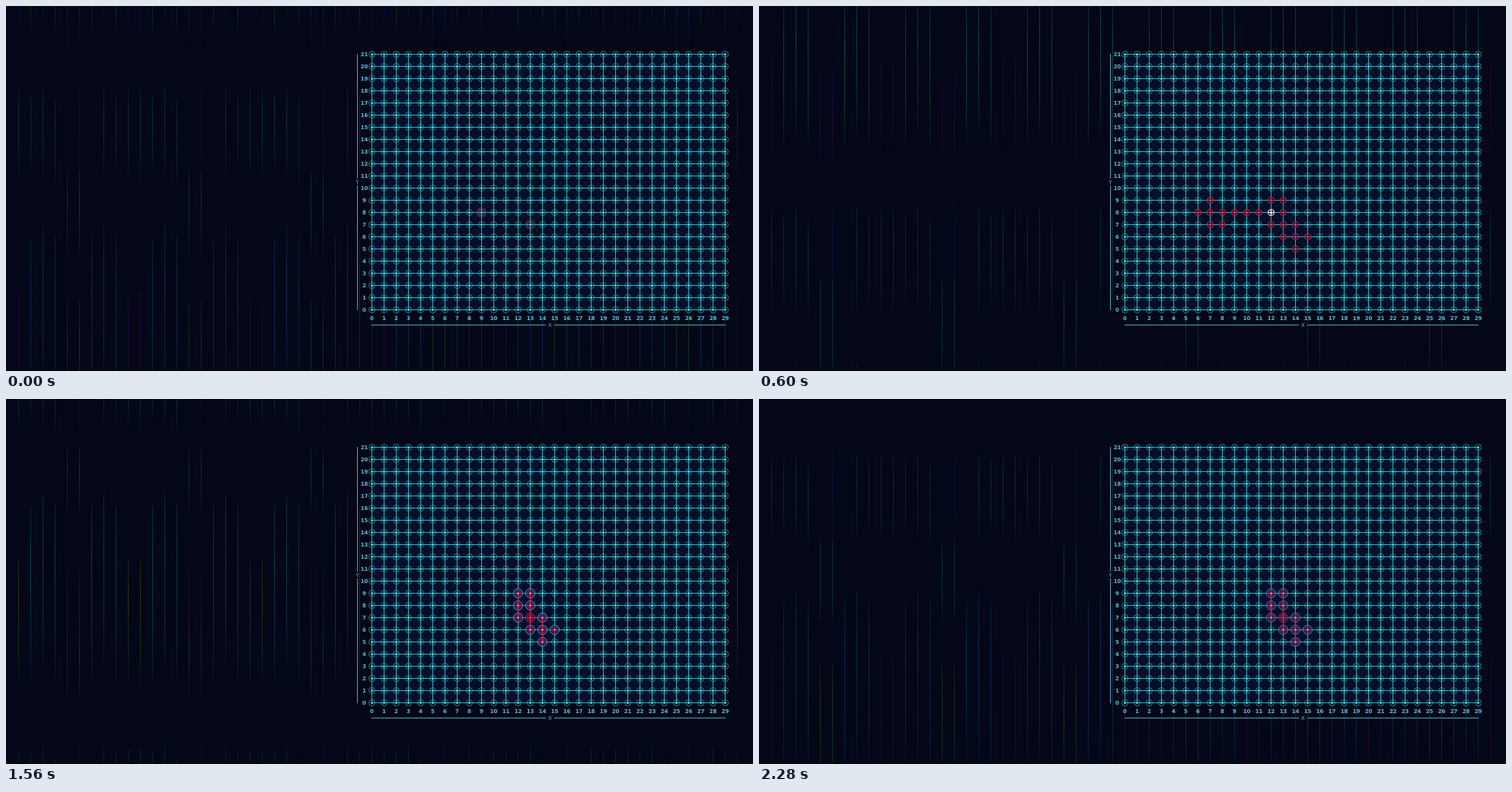
Animation of 981 by 480 pixels, one loop 2.4 s. Source, as an HTML page with a canvas:

```html
<!DOCTYPE html>
<html>
<head>
<meta charset="utf-8">
<style>
html, body { margin: 0; width: 100%; height: 100%; overflow: hidden; background: #030717; }
canvas { display: block; }
</style>
</head>
<body>
<canvas id="stage" width="981" height="480"></canvas>
<script>
const ctx = document.getElementById('stage').getContext('2d');
const LOOP = 2400, STEP = 120, TRAVEL = 520;
const COLS = 30, ROWS = 22, CELL = 16;
const gx = i => 480.5 + CELL * i;
const gy = j => 399.5 - CELL * j;

// Rain progress is uneven in time: [ms, distance]
const PACE = [[0, 0], [360, 95], [600, 158], [960, 235], [1560, 350], [2040, 435], [2280, 485], [2400, 520]];
// Per lane: top and bottom of the leading streak and of the weaker one behind it
const LEAD = [[32, 130], [-38, 125], [-55, 105], [-40, 122], [45, 145]];
const TRAIL = [[-60, 36], [-55, 25], [-63, 35], [-48, 45], [-68, 40]];

const LEFT = [[6, 8], [7, 9], [7, 8], [7, 7], [8, 8], [8, 7], [9, 8], [10, 8], [11, 8]];
const RIGHT = [[12, 9], [12, 8], [12, 7], [13, 9], [13, 8], [13, 7], [13, 6], [14, 7], [14, 6], [14, 5], [15, 6]];
const ALL = [...LEFT, ...RIGHT];
const SEEDS = [[9, 8], [13, 7]];
const isSeed = ([x, y]) => SEEDS.some(s => s[0] === x && s[1] === y);
const spread = ([x, y]) => Math.min(...SEEDS.map(s => Math.abs(s[0] - x) + Math.abs(s[1] - y)));

function progress(t) {
  const n = PACE.findIndex(p => p[0] > t);
  const [t0, p0] = PACE[n - 1], [t1, p1] = PACE[n];
  return p0 + (p1 - p0) * (t - t0) / (t1 - t0);
}

function line(x0, y0, x1, y1, color, width = 1) {
  ctx.strokeStyle = color;
  ctx.lineWidth = width;
  ctx.beginPath();
  ctx.moveTo(x0, y0);
  ctx.lineTo(x1, y1);
  ctx.stroke();
}

function ring([i, j], r, stroke, fill) {
  ctx.beginPath();
  ctx.arc(gx(i), gy(j), r, 0, 7);
  if (fill) {
    ctx.fillStyle = fill;
    ctx.fill();
  }
  if (stroke) {
    ctx.strokeStyle = stroke;
    ctx.lineWidth = 1;
    ctx.stroke();
  }
}

function streak(x, top, bottom, hue, hueEnd, alpha) {
  if (bottom <= 0 || top >= 480 || bottom <= top) return;
  const g = ctx.createLinearGradient(0, top, 0, bottom);
  const tone = (h, a) => `hsla(${h}, 85%, 45%, ${a * alpha})`;
  g.addColorStop(0, tone(hue, 0.6));
  g.addColorStop(0.3, tone(hue, 1));
  g.addColorStop(0.7, tone(hueEnd, 0.8));
  g.addColorStop(1, tone(hueEnd, 0.3));
  ctx.fillStyle = g;
  ctx.fillRect(x, top, 1, bottom - top);
}

function leadHue(lane, d) {
  if (lane === 0) return d < 300 ? 280 + 0.55 * d : 285;
  if (lane === 4) return 230 + 0.55 * d;
  return Math.min(205, 150 + 0.16 * Math.max(0, d));
}

function rain(t) {
  const p = progress(t);
  for (let k = 1; k <= 60; k++) {
    const m = k % 10, x = k * CELL;
    const lane = m < 2 ? 0 : m < 6 ? m - 1 : 10 - m;
    const tinted = lane % 4 === 0;
    for (const q of [p, p + TRAVEL]) {
      const d = q - 95, e = q - 350;
      const hue = leadHue(lane, d);
      const [a, b] = LEAD[lane], [c, f] = TRAIL[lane];
      const top = d < 0 ? a + d : a + 0.55 * d + 0.0006 * d * d;
      streak(x, top, b + 0.97 * d, hue, hue + (tinted ? 40 : 0), tinted ? 0.22 : 0.3);
      if (m !== 5 && m !== 7) {
        const h = lane === 4 ? 220 : 165;
        streak(x, c + e, f + 1.12 * e, h, h, 0.2);
      }
      if (lane === 4) streak(x, 65 + 0.9 * e, 150 + 1.05 * e, 170, 170, 0.22);
    }
  }
}

function grid() {
  ctx.fillStyle = '#020f29';
  ctx.fillRect(480, 63, 465, 337);
  for (let i = 0; i < COLS; i++) {
    for (let j = 0; j < ROWS; j++) ring([i, j], 4, '#1c9096');
  }
  for (let j = 0; j < ROWS; j++) line(480, gy(j), 945, gy(j), '#22b6c0');
  for (let i = 0; i < COLS; i++) line(gx(i), 63, gx(i), 400, '#22b6c0');
  for (let i = 0; i < COLS; i++) {
    for (let j = 0; j < ROWS; j++) ring([i, j], 1.5, null, '#5cd6e0');
  }
}

function axes() {
  const ink = '#4fa3c4';
  line(461.5, 63, 461.5, 227, ink);
  line(461.5, 236, 461.5, 400, ink);
  line(480, 419.5, 709, 419.5, ink);
  line(720, 419.5, 945, 419.5, ink);
  ctx.textAlign = 'center';
  ctx.textBaseline = 'alphabetic';
  ctx.fillStyle = '#5cbcda';
  ctx.font = 'bold 7px "DejaVu Sans", sans-serif';
  for (let i = 0; i < COLS; i++) ctx.fillText(i, gx(i), 413);
  for (let j = 0; j < ROWS; j++) ctx.fillText(j, 470.5, gy(j) + 2.5);
  ctx.font = '7px "DejaVu Sans", sans-serif';
  ctx.fillText('X', 714.5, 422);
  ctx.fillText('Y', 461.5, 234);
}

function links(cells, alpha) {
  for (const [x, y] of cells) {
    if (cells.some(c => c[0] === x && c[1] === y + 1)) {
      line(gx(x), gy(y), gx(x), gy(y + 1), `rgba(240, 20, 50, ${alpha})`, 1.5);
    }
  }
}

function search(t) {
  const reach = t / STEP * 1.4;
  const found = ALL.filter(c => spread(c) <= reach);
  if (t) links(found, 0.95);
  for (const c of found) {
    if (!isSeed(c)) {
      ring(c, 4, 'rgba(180, 50, 90, 0.5)');
      ring(c, 1.6, null, '#e07898');
    }
  }
  for (const c of SEEDS) {
    ring(c, 6, '#c81848');
    if (t) ring(c, 3.5, '#a83058');
  }
}

function marked() {
  for (const c of ALL) {
    const meet = c[0] === 12 && c[1] === 8;
    const [x, y] = [gx(c[0]), gy(c[1])];
    const color = meet ? '#fff' : '#c82048';
    ctx.fillStyle = '#020f29';
    ring(c, 4, color, '#020f29');
    line(x - 4, y, x + 4, y, color);
    line(x, y - 4, x, y + 4, color);
    ring(c, 1.5, null, meet ? '#fff' : '#e04068');
  }
}

function settled(t) {
  const fade = Math.max(0, 0.7 - (t - 720) / 480);
  for (const c of LEFT) ring(c, 6, `rgba(45, 90, 190, ${fade})`);
  const glow = 0.7 + 0.3 * Math.cos((t - 1500) / 960 * 2 * Math.PI);
  for (const c of RIGHT) {
    const seed = isSeed(c);
    ring(c, 6, seed ? '#d01848' : `rgba(80, 165, 240, ${glow})`, `rgba(60, 0, 60, ${0.6 * glow})`);
    ring(c, 3.5, `rgba(200, 20, 85, ${0.3 + 0.4 * glow})`);
  }
  links(RIGHT, 0.85);
  for (const c of RIGHT) ring(c, 1.6, null, isSeed(c) ? '#e82c58' : '#f070a0');
}

function draw(now) {
  const t = Math.floor(now % LOOP / STEP) * STEP;
  ctx.fillStyle = '#030717';
  ctx.fillRect(0, 0, 981, 480);
  rain(t);
  grid();
  axes();
  if (t < 480) search(t);
  else if (t < 720) marked();
  else settled(t);
  ctx.fillStyle = '#000';
  ctx.fillRect(0, 479, 981, 1);
}

const start = performance.now();
function tick() {
  draw(performance.now() - start);
  requestAnimationFrame(tick);
}
tick();
</script>
</body>
</html>
```
